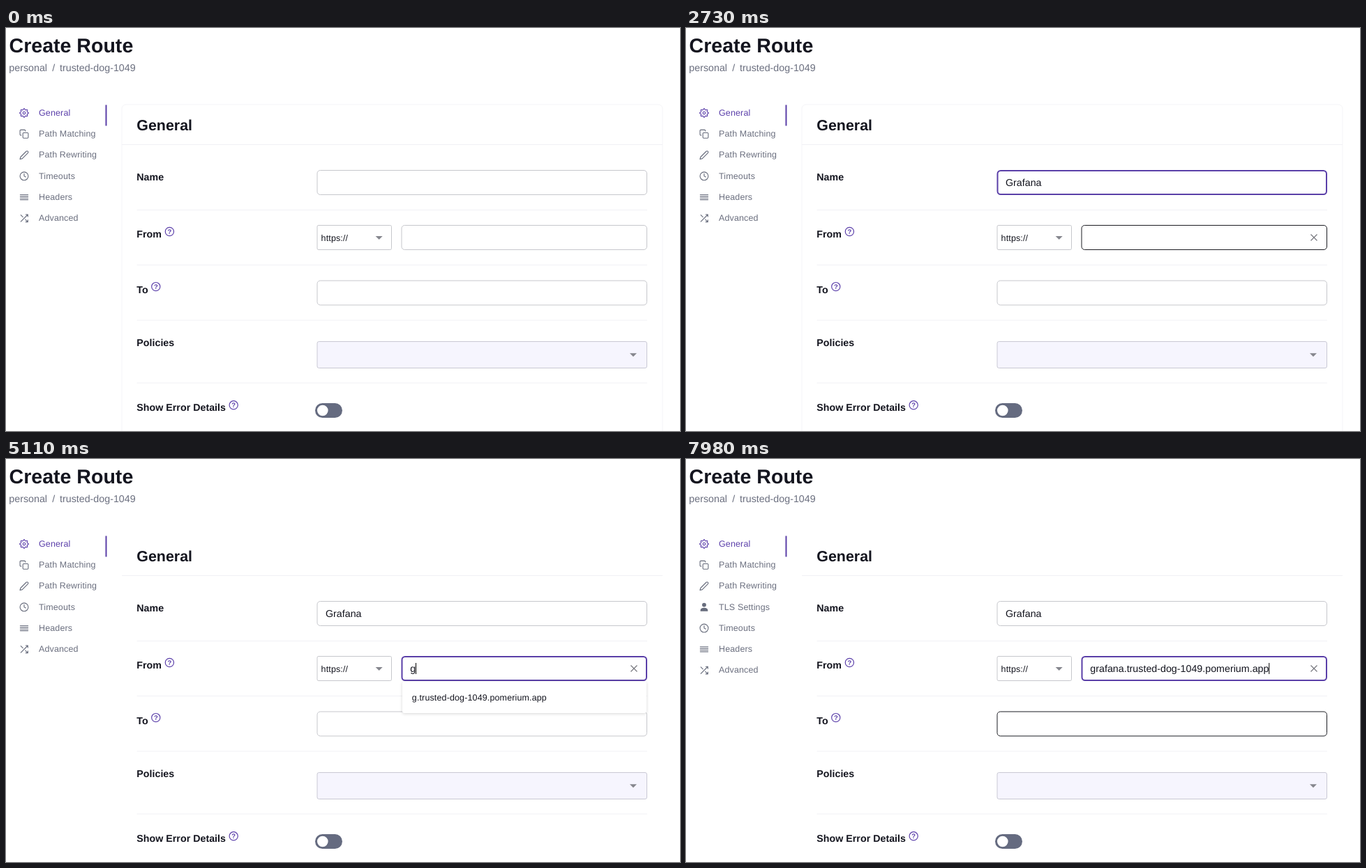
Write an HTML page that moves like this. It is 966 by 579 pixels and loops after 8 s.

```html
<!DOCTYPE html>
<html lang="en">
<head>
<meta charset="utf-8">
<title>Create Route</title>
<style>
html, body { margin: 0; width: 100%; height: 100%; overflow: hidden; background: #fff; }
svg { display: block; width: 966px; height: 579px; }
text { font: 14.286px "Liberation Sans", Arial, sans-serif; fill: #14151f; white-space: pre; text-rendering: geometricPrecision; }
text.bold { font-weight: bold; }
text.title { font-size: 28.57px; }
text.head { font-size: 21.43px; }
text.small { font-size: 12.5px; letter-spacing: .134px; }
text.gray { fill: #6b6f7f; }
text.purple { fill: #5c40aa; }
text.mark { font-size: 9.5px; font-weight: bold; fill: #5c40aa; text-anchor: middle; }
.icon { fill: none; stroke: #686d7d; stroke-width: 1.9; stroke-linecap: round; stroke-linejoin: round; }
.purple .icon { stroke: #5c40aa; }
.icon.solid { fill: #686d7d; stroke: none; }
.rule { stroke: #f1f1f5; }
.field { fill: #fff; stroke: #c6c7cc; }
.arrow { fill: #85868d; }
.ask { fill: none; stroke: #5c40aa; stroke-width: 1.2; }
.caret { fill: #000; }
.panel { fill: #fff; filter: drop-shadow(0 1px 2px rgba(0, 0, 0, .16)); }
</style>
</head>
<body>
<svg id="stage" viewBox="0 0 966 579"></svg>
<script>
const LOOP = 8000, STEP = 70;
const PURPLE = '#5a3fa8', DARK = '#1b1c22', LINE = '#c6c7cc';
const stage = document.getElementById('stage');

function add(tag, attrs, parent = stage) {
  const el = document.createElementNS('http://www.w3.org/2000/svg', tag);
  for (const key in attrs) el.setAttribute(key, attrs[key]);
  parent.appendChild(el);
  return el;
}
function label(x, y, str, cls = '', parent = stage) {
  const el = add('text', { x, y, class: cls }, parent);
  el.textContent = str;
  return el;
}
function box(x, y, width, height, rx, cls, parent = stage) {
  return add('rect', { x, y, width, height, rx, class: cls }, parent);
}
const rule = (y, x1 = 187.5, x2 = 919) => add('path', { d: `M${x1} ${y}H${x2}`, class: 'rule' });
const arrow = (x, y) => add('path', { d: `M${x - 5} ${y - 2.5}h10l-5 5z`, class: 'arrow' });
const show = (el, on) => el.setAttribute('visibility', on ? 'visible' : 'hidden');

function ask(x, y) {
  add('circle', { cx: x, cy: y, r: 6.1, class: 'ask' });
  label(x, y + 3.4, '?', 'mark');
}

function gearPath() {
  let d = '';
  for (let i = 0; i < 32; i++) {
    const r = i % 4 < 2 ? 10.6 : 8, a = (i - .5) * Math.PI / 16;
    d += `${i ? 'L' : 'M'}${(12 + r * Math.cos(a)).toFixed(2)} ${(12 + r * Math.sin(a)).toFixed(2)}`;
  }
  return d + 'zM15 12a3 3 0 1 1-6 0a3 3 0 1 1 6 0z';
}

const ICONS = {
  General: gearPath(),
  'Path Matching': 'M11 9h9a2 2 0 0 1 2 2v9a2 2 0 0 1-2 2h-9a2 2 0 0 1-2-2v-9a2 2 0 0 1 2-2zM5 15H4a2 2 0 0 1-2-2V4a2 2 0 0 1 2-2h9a2 2 0 0 1 2 2v1',
  'Path Rewriting': 'M17 3a2.83 2.83 0 1 1 4 4L7.5 20.5 2 22l1.5-5.5z',
  'TLS Settings': 'M12 1.5a5 5 0 1 1 0 10a5 5 0 1 1 0-10zM3 22v-2.5c0-4 3.5-6 9-6s9 2 9 6V22z',
  Timeouts: 'M22 12a10 10 0 1 1-20 0a10 10 0 1 1 20 0zM12 6v6l4 2',
  Headers: 'M2.5 6h19M2.5 10h19M2.5 14h19M2.5 18h19',
  Advanced: 'M16 3h5v5M4 20 21 3M21 16v5h-5M15 15l6 6M4 4l5 5'
};

// Page header and side menu
label(4.5, 35, 'Create Route', 'bold title');
label(4.3, 62, 'personal', 'gray');
label(66.3, 62, '/', 'gray');
label(77, 62, 'trusted-dog-1049', 'gray');

const menu = Object.entries(ICONS).map(([name, d]) => {
  const main = name === 'General', solid = name === 'TLS Settings';
  const g = add('g', main ? { class: 'purple' } : {});
  add('path', { d, class: solid ? 'icon solid' : 'icon', transform: 'translate(18.9 -6.7) scale(.59)' }, g);
  label(47, 4.2, name, 'small ' + (main ? 'purple' : 'gray'), g);
  return { g, solid };
});
add('rect', { x: 142.5, y: 110.5, width: 2, height: 30, fill: PURPLE });

// Card with form rows
const card = box(166, 110, 775, 500, 6, '');
card.setAttribute('fill', 'none');
card.setAttribute('stroke', '#f5f5f8');
label(187.3, 146.5, 'General', 'bold head');
rule(167.5, 166, 941);
[261.5, 340.5, 420, 510].forEach(y => rule(y));
[['Name', 219.3], ['From', 301.2], ['To', 380.5], ['Policies', 457.2], ['Show Error Details', 549.9]]
  .forEach(([name, y]) => label(187.3, y, name, 'bold'));
ask(234.4, 292.5);
ask(214.8, 371.6);
ask(326.2, 541.8);

function field(x, y, w) {
  const el = box(x, y, w, 35, 4.5, 'field');
  return state => {
    const inset = state === 'focus' ? .5 : 0;
    const at = { x: x + inset, y: y + inset, width: w - 2 * inset, height: 35 - 2 * inset };
    for (const key in at) el.setAttribute(key, at[key]);
    el.style.stroke = { idle: LINE, hover: DARK, focus: PURPLE }[state];
    el.style.strokeWidth = state === 'focus' ? 2 : 1;
  };
}
function typed(x, y, top) {
  const el = label(x, y, '');
  const caret = add('rect', { y: top, width: 1, height: 16, class: 'caret' });
  return (str, caretOn) => {
    if (el.textContent !== str) el.textContent = str;
    caret.setAttribute('x', x + (str ? el.getComputedTextLength() : 0) - .2);
    show(caret, caretOn);
  };
}

const nameField = field(446, 204.5, 472.5);
const nameText = typed(458, 226.5, 214);

const ring = add('rect', { x: 444.5, y: 282.5, width: 109, height: 37, rx: 3, fill: 'none', stroke: '#d8d2f2', 'stroke-width': 3 });
const select = box(446, 283.5, 106.5, 35, 2, 'field');
label(451.6, 305.5, 'https://', 'small');
const selectArrow = arrow(534.7, 301.5);

const fromField = field(567, 283.5, 351.5);
const fromText = typed(579.3, 306, 293);
const clear = add('path', { d: 'M895.5 296.5l9 9m0-9l-9 9', stroke: '#77787e', 'stroke-width': 1.2 });

const toField = field(446, 363, 472.5);

const policies = box(446, 450.5, 472.5, 38, 2.5, 'field');
policies.style.fill = '#f6f5fe';
policies.style.stroke = '#c9c9d4';
arrow(899, 469.7);
add('rect', { x: 443, y: 539, width: 39, height: 21, rx: 10.5, fill: '#656b80' });
add('circle', { cx: 453.8, cy: 549.5, r: 7.8, fill: '#fff' });

// Floating panels
const drop = add('g', {});
box(446.5, 326, 105, 71.5, 3.5, 'panel', drop);
add('rect', { x: 446.5, y: 326, width: 105, height: 32, fill: '#ebe9f9' }, drop);
label(460.5, 346.8, 'https://', '', drop);
label(460.5, 378.8, 'tcp+https://', '', drop);

const hint = add('g', {});
box(568, 319.5, 350, 45.5, 3, 'panel', hint);
const hintRow = add('rect', { x: 568, y: 327, width: 350, height: 31, fill: '#f8f8f9' }, hint);
const hintText = label(581.8, 346.6, '', 'small', hint);

// Each table lists [start ms, value]; the last started entry holds.
const HOST = '.trusted-dog-1049.pomerium.app';
const tracks = {
  name: [[0, 'idle'], [70, 'hover'], [350, 'focus'], [3290, 'idle']],
  nameCaret: [[0, 0], [350, 1], [910, 0], [1120, 1], [2450, 0], [2940, 1], [3290, 0]],
  nameLen: [[0, 0], [1120, 1], [1260, 2], [1400, 3], [1540, 4], [1680, 5], [1820, 6], [1960, 7]],
  from: [[0, 'idle'], [2590, 'hover'], [3010, 'idle'], [4270, 'hover'], [4480, 'focus']],
  fromCaret: [[0, 0], [4480, 1], [4970, 0], [5110, 1], [5880, 0], [6160, 1], [7210, 0], [7770, 1]],
  fromLen: [[0, 0], [5110, 1], [5320, 2], [5390, 3], [6160, 4], [6440, 5], [6580, 6], [6720, 7], [7770, 7 + HOST.length]],
  select: [[0, 'idle'], [3290, 'focus'], [4480, 'idle']],
  to: [[0, 'idle'], [7980, 'hover']]
};
function at(track, t) {
  let value;
  for (const [start, v] of tracks[track]) if (t >= start) value = v;
  return value;
}
const clamp = v => Math.max(0, Math.min(1, v));

function render(time) {
  const t = Math.floor(time / STEP) * STEP;

  nameField(at('name', t));
  nameText('Grafana'.slice(0, at('nameLen', t)), at('nameCaret', t));

  const from = at('from', t), length = at('fromLen', t);
  const entry = ('grafana' + HOST).slice(0, length);
  fromField(from);
  fromText(entry, at('fromCaret', t));
  show(clear, from !== 'idle');

  const focused = at('select', t) === 'focus';
  show(ring, focused);
  select.style.stroke = focused ? PURPLE : LINE;
  select.style.strokeWidth = focused ? 1.6 : 1;
  const open = t >= 3290 && t < 3920;
  selectArrow.setAttribute('transform', open ? 'rotate(180 534.7 301.3)' : '');

  const grow = clamp((t - 3290) / 280);
  const ease = 1 - (1 - grow) ** 2;
  const fade = 1 - clamp((t - 3850) / 210);
  const scale = .75 + .25 * ease;
  drop.setAttribute('opacity', ease * fade);
  drop.setAttribute('transform', `translate(499 326) scale(${scale} ${scale * scale}) translate(-499 -326)`);
  show(card, t < 3290);

  const hinted = length > 0 && length <= 7;
  hint.style.display = hinted ? '' : 'none';
  hintRow.style.display = t >= 7280 ? '' : 'none';
  if (hinted) hintText.textContent = entry + HOST;

  toField(at('to', t));

  const tls = t >= 5320;
  let row = 0;
  for (const { g, solid } of menu) {
    g.style.display = solid && !tls ? 'none' : '';
    if (solid && !tls) continue;
    g.setAttribute('transform', `translate(0 ${121.7 + 30.25 * row++})`);
  }
}

const begin = performance.now();
function tick() {
  render((performance.now() - begin) % LOOP);
  requestAnimationFrame(tick);
}
tick();
</script>
</body>
</html>
```
